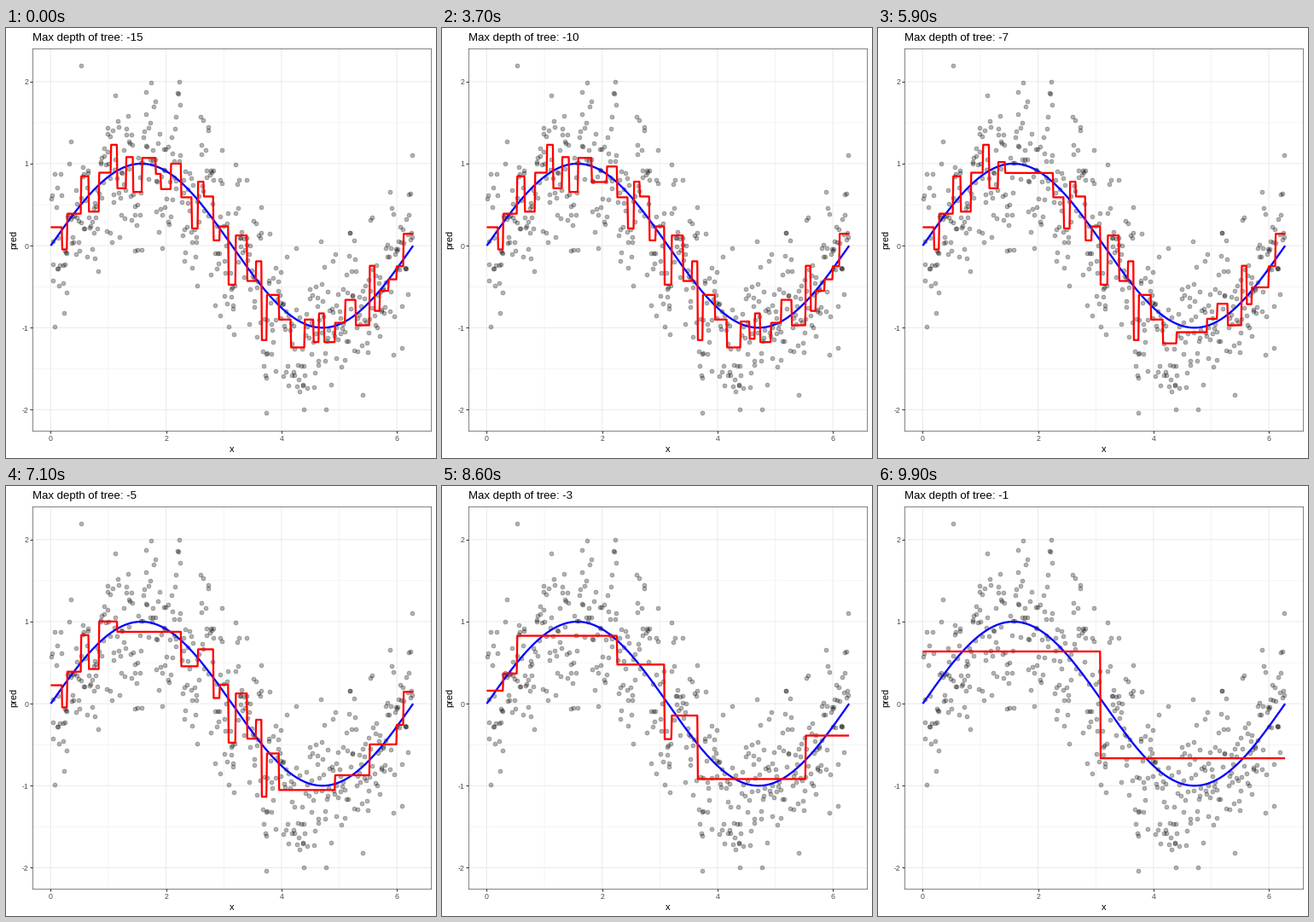
A matplotlib script that plays this animation: 504 px wide and 504 px high, repeating every 10000 ms.

```python
import numpy as np
import matplotlib.pyplot as plt
from matplotlib.animation import FuncAnimation

SIZE, DPI, FRAMES = 504, 72, 100
LEFT, RIGHT, TOP, BOTTOM = 31.2, 498.4, 23.6, 472.2
DEEPEST = 15
GRID, DARK = "#EBEBEB", "#333333"

plt.rcParams["font.family"] = "Liberation Sans"

# The fully grown step function: where it jumps and its level in between
CUTS = [.195, .284, .525, .658, .836, 1.043, 1.151, 1.306, 1.427, 1.582,
        1.819, 1.908, 2.082, 2.26, 2.445, 2.551, 2.652, 2.82, 2.928, 3.08,
        3.205, 3.404, 3.557, 3.656, 3.744, 3.956, 4.163, 4.4, 4.555, 4.647,
        4.74, 4.927, 5.105, 5.287, 5.528, 5.615, 5.704, 5.856, 5.997, 6.115]
MEANS = np.array(
    [.225, -.045, .39, .845, .415, .89, 1.23, .7, 1.08, .655, 1.07,
     .875, .69, 1, .59, .21, .78, .6, .065, .235, -.475,
     .125, -.43, -.19, -1.15, -.6, -.9, -1.24, -.9, -1.175, -.825,
     -1.175, -.94, -.66, -.97, -.245, -.795, -.55, -.41, -.25, .145])
EDGES = np.array([0, *CUTS, 2 * np.pi])
WIDTHS = np.diff(EDGES)
fits = np.zeros((DEEPEST + 1, len(MEANS)))


def average(lo, hi):
    return np.average(MEANS[lo:hi], weights=WIDTHS[lo:hi])


def grow(lo, hi, depth=0):
    """Greedy regression tree: split where the squared error drops most."""
    fits[depth:, lo:hi] = average(lo, hi)
    if hi - lo == 1 or depth == DEEPEST:
        return

    def gain(k):
        return sum(WIDTHS[a:b].sum() * average(a, b) ** 2
                   for a, b in ((lo, k), (k, hi)))

    cut = max(range(lo + 1, hi), key=gain)
    grow(lo, cut, depth + 1)
    grow(cut, hi, depth + 1)


def sample(n=500):
    """Noisy observations scattered around the steps."""
    rng = np.random.default_rng(7)
    x = 2 * np.pi * (np.arange(n) + rng.uniform(-1, 1, n)) / n
    x = np.clip(x, 0, 2 * np.pi)
    leaf = np.searchsorted(CUTS, x, side="right")
    y = MEANS[leaf] + rng.normal(0, .47, n)
    wave = np.sin(x)
    return x, np.clip(y, wave - 1.05, wave + 1.05)


grow(0, len(MEANS))

fig = plt.figure(figsize=(SIZE / DPI, SIZE / DPI), dpi=DPI, facecolor="white")
ax = fig.add_axes([LEFT / SIZE, 1 - BOTTOM / SIZE,
                   (RIGHT - LEFT) / SIZE, (BOTTOM - TOP) / SIZE])
ax.set(xlim=(-.314, 6.597), ylim=(-2.257, 2.408),
       xticks=range(0, 7, 2), yticks=range(-2, 3))
ax.set_yticklabels([str(v) for v in range(-2, 3)])
ax.tick_params(length=2.75, width=1.07, color=DARK, pad=2.2,
               labelsize=8.8, labelcolor="#4D4D4D")
for spine in ax.spines.values():
    spine.set(color=DARK, linewidth=.6, zorder=9)

for x in range(7):
    ax.axvline(x, color=GRID, lw=.53 if x % 2 else 1.07, zorder=0, snap=False)
for y in np.arange(-2, 2.1, .5):
    ax.axhline(y, color=GRID, lw=.53 if y % 1 else 1.07, zorder=0, snap=False)


def label(x, y, text, size, **kw):
    kw.setdefault("va", "baseline")
    return fig.text(x / SIZE, 1 - y / SIZE, text, fontsize=size, **kw)


title = label(31, 15.2, "", 13.2)
label(264.8, 496.6, "x", 11, ha="center")
label(14, 247.7, "pred", 11, rotation=90, ha="right", va="center")

px, py = sample()
# The most distant observations
px = np.append(px, [.53, 2.23, 6.26, 3.73])
py = np.append(py, [2.2, 2.0, 1.1, -2.04])
ax.scatter(px, py, s=5 ** 2, facecolor=(0, 0, 0, .3),
           edgecolor=(0, 0, 0, .3), linewidth=.71, zorder=2)

line = dict(lw=2.3, solid_capstyle="butt", solid_joinstyle="round",
            snap=False)
wave_x = np.linspace(0, 2 * np.pi, 500)
ax.plot(wave_x, np.sin(wave_x), color="#0000FF", zorder=3, **line)

# Risers lean slightly, as between neighbouring samples
LEAN = .005
step_x = np.repeat(EDGES, 2)[1:-1]
step_x[1:-1] += np.tile([-LEAN, LEAN], len(CUTS))
steps, = ax.plot(step_x, 0 * step_x, color="#FF0000", zorder=4, **line)


def draw(i):
    depth = DEEPEST - (DEEPEST - 1) * i / (FRAMES - 1)
    low = min(int(depth), DEEPEST - 1)
    mix = depth - low
    level = (1 - mix) * fits[low] + mix * fits[low + 1]
    steps.set_ydata(np.repeat(level, 2))
    title.set_text(f"Max depth of tree: {-round(depth)}")
    return steps, title


anim = FuncAnimation(fig, draw, frames=FRAMES, interval=100, repeat=True,
                     repeat_delay=0, blit=False)
plt.show()
```
